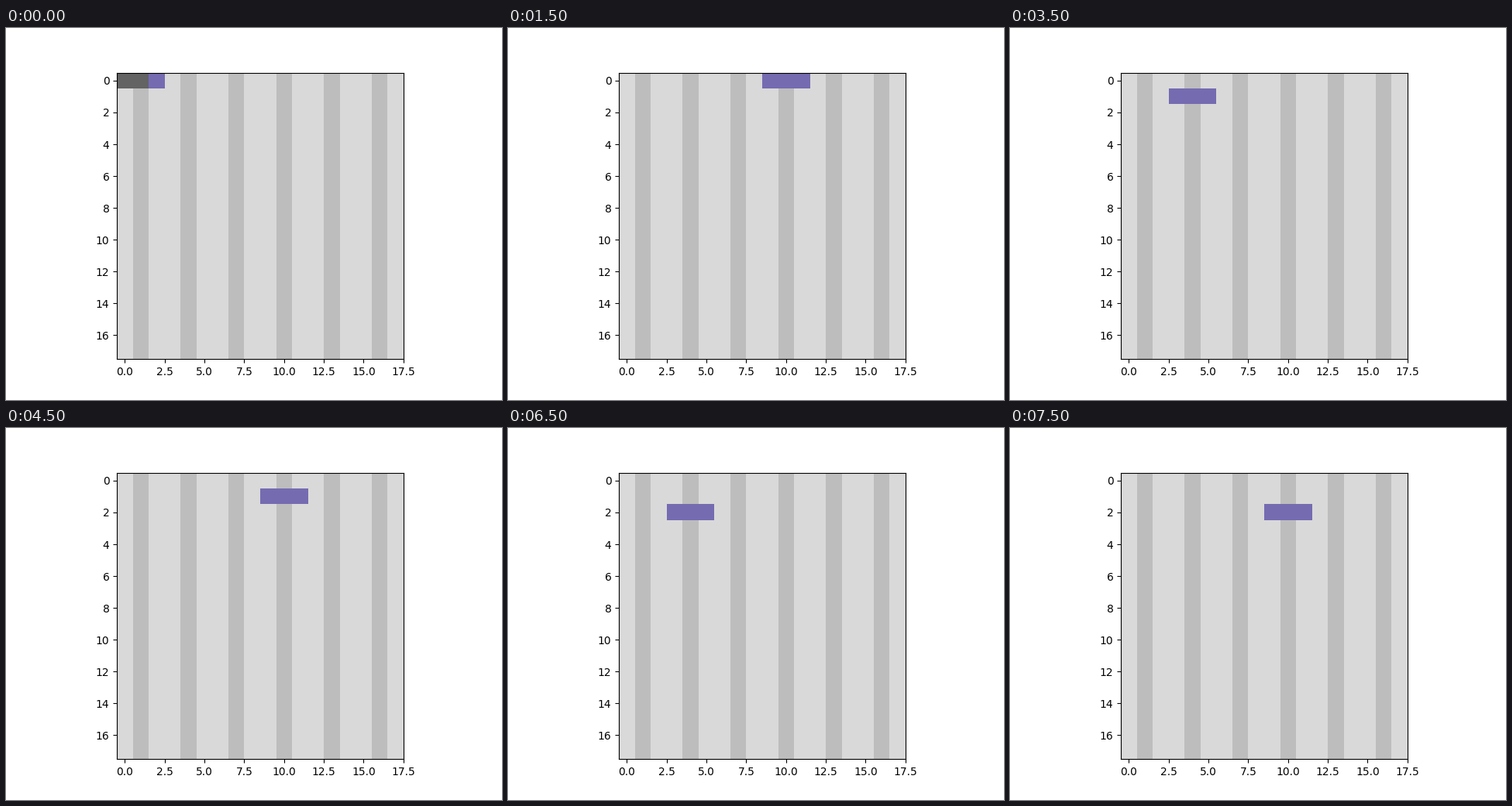
Animation, 640 px wide and 480 px high, one loop 8 s. Source, as a matplotlib script:

```python
import numpy as np
import matplotlib.pyplot as plt
from matplotlib.animation import FuncAnimation
from matplotlib.colors import ListedColormap

SIZE = 18
CODON = 3
PER_ROW = SIZE // CODON
STEPS = 16
LIGHT, STRIPE, DARK, PURPLE = range(4)
COLORS = ["#d9d9d9", "#bdbdbd", "#636363", "#756bb1"]

# Cells (row, column) that turn dark instead of purple when the window covers them.
MISSES = {(0, 0), (0, 1), (1, 15)}

background = np.full((SIZE, SIZE), LIGHT)
background[:, 1::CODON] = STRIPE


def grid_at(step):
    grid = background.copy()
    row, slot = divmod(step, PER_ROW)
    for col in range(slot * CODON, (slot + 1) * CODON):
        grid[row, col] = DARK if (row, col) in MISSES else PURPLE
    return grid


fig, ax = plt.subplots(figsize=(6.4, 4.8), dpi=100)
image = ax.imshow(grid_at(0), cmap=ListedColormap(COLORS), vmin=-0.5, vmax=3.5,
                  interpolation="nearest")


def update(step):
    image.set_data(grid_at(step))
    return (image,)


anim = FuncAnimation(fig, update, frames=STEPS, interval=500, repeat=True,
                     repeat_delay=0, blit=False)
plt.show()
```
